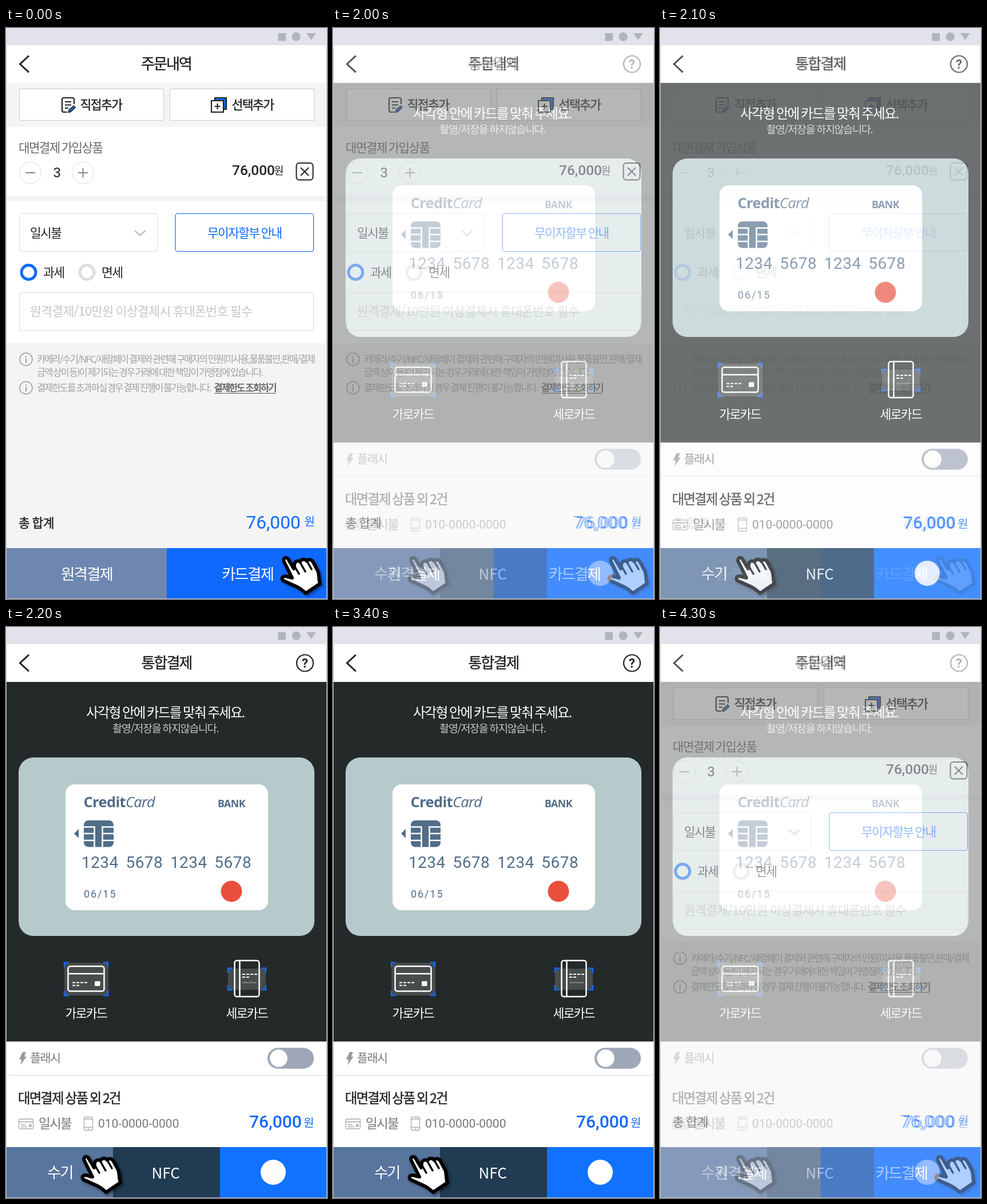
An HTML page for the animation above (4400 ms loop, 561 by 998 pixels).

```html
<!DOCTYPE html>
<html lang="ko">
<meta charset="utf-8">
<title>결제 화면</title>
<style>
html, body { margin: 0; width: 100%; height: 100%; overflow: hidden; background: #fff }
svg { display: block; width: 561px; height: 998px; fill: none }
text { font-family: "Noto Sans CJK KR", "Noto Sans CJK", sans-serif; letter-spacing: -.075em; word-spacing: -.06em; fill: #222; white-space: pre }
.m { font-weight: 500; stroke: #222; stroke-width: .4px }
.r { font-family: Roboto, sans-serif; letter-spacing: 0; stroke: none }
.c { font-family: "Open Sans", sans-serif; letter-spacing: -.025em; fill: #506d89 }
.w text { fill: #fff }
.note text { font-size: 16.5px; letter-spacing: -.115em; fill: #a0a0a0 }
.note .link { fill: #555; stroke: #555; stroke-width: .4px; font-weight: 500 }
.blue, .w .blue { fill: #1168fd }
.gray { fill: #777 }
.hand { filter: drop-shadow(3px 3px 2px rgba(0, 0, 0, .4)) }
</style>
<svg viewBox="0 0 561 998">
  <defs>
    <path id="back" d="M40 48.5L24.5 63L40 77.5" stroke="#222" stroke-width="3"/>
    <g id="info" stroke="#a0a0a0" stroke-width="1.6">
      <circle r="11"/><path d="M0-6v2.4M0-1.5v8" stroke-width="2"/>
    </g>
    <g id="hand" class="hand" stroke="#000" stroke-linejoin="round" stroke-linecap="round">
      <path fill="#fff" stroke-width="6" d="M493 928C489 923 483 927 486 933L500 961L488 958C481 958 481 965 487 967L507 976Q514 979 524 988L549 971C546 964 548 957 545 949L537 934C534 928 528 928 526 932C523 927 516 928 514 933C510 930 504 932 504 938L503 945Z"/>
      <path stroke-width="3.5" d="M504 940l8 14M514 934l9 16M526 932l8 14"/>
    </g>
  </defs>

  <g id="order">
    <path fill="#fff" d="M0 30h561v968H0z"/>
    <path fill="#f4f4f4" d="M0 96h561v76.500H0zM0 293h561v10H0zM0 551h561v358H0z"/>
    <use href="#back"/>
    <text x="236" y="72" font-size="26" class="m">주문내역</text>

    <path fill="#fff" stroke="#ccc" d="M23.500 106.500h252v55h-252zM286.500 106.500h252v55h-252z"/>
    <g stroke="#222" stroke-width="2.200">
      <path d="M119 133v-8q0-3-3-3h-15q-3 0-3 3v19q0 3 3 3h6M103 129h11M103 134.500h11M103 140h6"/>
      <path fill="#1168fd" stroke-width="1.600" d="M118 136l3 3-8 7.500-4 1 1-4z"/>
      <path fill="#1168fd" d="M365 122h20v20h-20z"/>
      <path fill="#fff" d="M359 127h21v20h-21zM369.500 132v10M364.500 137h10"/>
    </g>
    <text x="129.500" y="142" font-size="21.600" class="m">직접추가</text>
    <text x="394.500" y="142" font-size="21.600" class="m">선택추가</text>

    <text x="22" y="217" font-size="21.200" style="fill:#666">대면결제 가입상품</text>
    <g stroke="#ddd"><circle cx="42.500" cy="253" r="19"/><circle cx="134.500" cy="253" r="19"/></g>
    <path stroke="#888" stroke-width="2" d="M34 253h17M126 253h17M134.500 244.500v17"/>
    <text x="82.500" y="261" font-size="24" class="r">3</text>
    <text x="395" y="257" font-size="24.500" class="r m">76,000</text>
    <text x="468.500" y="256" font-size="18.500">원</text>
    <g stroke="#222" stroke-width="2">
      <rect x="507.500" y="236" width="29" height="29.500" rx="5"/>
      <path d="M515 244l14 14M529 244l-14 14"/>
    </g>

    <g stroke="#ddd" stroke-width="1.200">
      <rect x="23.500" y="324.500" width="241" height="66" rx="4"/>
      <rect x="23.500" y="462.500" width="514" height="66" rx="4"/>
      <rect x="296" y="324.500" width="241.500" height="66" rx="4" stroke="#1168fd"/>
    </g>
    <path stroke="#c4c4c4" stroke-width="2.500" d="M225 354l9.500 8.500 9.500-8.500"/>
    <text x="42" y="366" font-size="21.400">일시불</text>
    <text x="352" y="366" font-size="21.400" class="blue">무이자할부 안내</text>
    <g stroke-width="5">
      <circle cx="39.500" cy="427" r="12.500" stroke="#1168fd"/>
      <circle cx="141.500" cy="427" r="12.500" stroke="#ddd"/>
    </g>
    <text x="65" y="435" font-size="21.600">과세</text>
    <text x="167" y="435" font-size="21.600">면세</text>
    <text x="42" y="503" font-size="21.500" style="letter-spacing:-.028em;fill:#c6c6c6">원격결제/10만원 이상결제시 휴대폰번호 필수</text>

    <use href="#info" x="35" y="579"/>
    <use href="#info" x="35" y="629"/>
    <g class="note">
      <text x="54" y="585">카메라/수기/NFC/새람페이 결제와 관련해 구매자의 민원(미사용,물품불만,판매/결제</text>
      <text x="54" y="608">금액 상이 등)이 제기되는 경우 거래에 대한 책임이 가맹점에 있습니다.</text>
      <text x="54" y="635">결제한도를 초과하실 경우 결제 진행이 불가능합니다.</text>
      <text x="363.500" y="635" class="link">결제한도 조회하기</text>
    </g>
    <path stroke="#555" d="M364 638.500h107"/>

    <text x="22" y="873" font-size="21.500" class="m" style="letter-spacing:-.025em">총 합계</text>
    <text x="419.500" y="875" font-size="31.700" class="r blue">76,000</text>
    <text x="521.500" y="870" font-size="20" class="blue">원</text>

    <path fill="#6d87b0" d="M0 909h281v89H0z"/>
    <path fill="#0f69ff" d="M281 909h280v89H281z"/>
    <g class="w" font-size="26.600">
      <text x="96" y="964">원격결제</text>
      <text x="377" y="964">카드결제</text>
    </g>
    <use href="#hand"/>
  </g>

  <g id="pay">
    <path fill="#fff" d="M0 30h561v968H0z"/>
    <use href="#back"/>
    <text x="236.500" y="72" font-size="26" class="m">통합결제</text>
    <circle cx="522.500" cy="63" r="14.500" stroke="#222" stroke-width="2.200"/>
    <text x="522.500" y="71" font-size="22" font-weight="700" text-anchor="middle" class="r">?</text>

    <path fill="#242a2a" d="M0 96h561v628.500H0z"/>
    <g class="w">
      <text x="140" y="158" font-size="23.500">사각형 안에 카드를 맞춰 주세요.</text>
      <text x="186" y="184" font-size="18.600" style="fill:#c4c6c6">촬영/저장을 하지않습니다.</text>
      <text x="103.500" y="683" font-size="21.500">가로카드</text>
      <text x="384.500" y="683" font-size="21.500">세로카드</text>
    </g>

    <rect x="22" y="228" width="517" height="312" rx="26" fill="#b6cacc"/>
    <rect x="104" y="275" width="354" height="220" rx="16" fill="#fff"/>
    <text x="135.500" y="315" font-size="25.500" class="c"><tspan font-weight="700">Credit</tspan><tspan font-style="italic">Card</tspan></text>
    <text x="370" y="315" font-size="17.700" font-weight="700" class="c">BANK</text>
    <path fill="#506d89" d="M127 353l-8 8 8 8z"/>
    <rect x="136" y="338" width="52" height="46.500" rx="8" fill="#506d89"/>
    <path stroke="#fff" stroke-width="2.600" d="M136 349.500h19.800M136 361h18M136 373h18M167.200 349.500h20.800M168 361h20M168 373h20M154.500 349v36M168.500 349v36"/>
    <text x="132" y="421" font-size="28" class="r" style="letter-spacing:.45px;word-spacing:5.300px;fill:#506d89">1234 5678 1234 5678</text>
    <text x="136" y="473" font-size="18" class="r" style="letter-spacing:1.900px;fill:#506d89">06/15</text>
    <circle cx="394" cy="462" r="18.500" fill="#e94f3d"/>

    <path fill="#474c4c" d="M102 587h77v57h-77zM388 597h66v37h-66z"/>
    <path stroke="#1168fd" stroke-width="2.600" d="M110 586.500h-8v8M170 586.500h8v8M110 644h-8v-8M170 644h8v-8M396 596.500h-8v8M446 596.500h8v8M396 634h-8v-8M446 634h8v-8"/>
    <g stroke="#fff" stroke-width="2.500">
      <rect x="108.500" y="593" width="63" height="43.500" rx="4"/>
      <rect x="399.500" y="583" width="43" height="63" rx="4"/>
      <path d="M108 606h64M408.500 583v63"/>
      <path stroke-width="2" stroke-dasharray="5 2" d="M116 621.500h27M116 626.500h12M413 607h26M413 612h12"/>
      <path stroke="#777b7b" d="M413 621.500h25"/>
    </g>
    <rect x="155" y="619" width="9.500" height="8.500" rx="1.500" fill="#fff"/>

    <path fill="#999" d="M29 743h6l-3 8h4L25 766l2.500-10H23z"/>
    <text x="42" y="761" font-size="20.700" class="gray">플래시</text>
    <rect x="457" y="735.500" width="81" height="36.500" rx="18.250" fill="#9fa8b8"/>
    <circle cx="476.500" cy="753.800" r="15.300" fill="#fff"/>
    <path stroke="#ddd" d="M0 783.500h561"/>

    <text x="21" y="832" font-size="23.300" class="m">대면결제 상품 외 2건</text>
    <g stroke="#aaa" stroke-width="1.300">
      <rect x="22.500" y="860" width="25" height="17" rx="1.500"/>
      <path d="M22 865h26M26 870h8M26 873.500h11"/>
      <path fill="#aaa" d="M41 870h3v3h-3z"/>
      <rect x="136.500" y="856.500" width="15" height="23" rx="2"/>
      <path d="M136 860h16M136 874.500h16M143 877h2"/>
    </g>
    <text x="57" y="875.500" font-size="22.500" class="gray">일시불</text>
    <text x="161" y="875" font-size="21" class="r gray">010-0000-0000</text>
    <text x="425" y="875" font-size="30" class="r m blue">76,000</text>
    <text x="520" y="873.500" font-size="20" class="blue">원</text>

    <path fill="#57759d" d="M0 909h187v89H0z"/>
    <path fill="#213b52" d="M187 909h187v89H187z"/>
    <path fill="#1072ff" d="M374 909h187v89H374z"/>
    <g class="w">
      <text x="72" y="963" font-size="26.300">수기</text>
      <text x="254.500" y="964" font-size="26" style="letter-spacing:0">NFC</text>
    </g>
    <circle cx="467" cy="953" r="22" fill="#fff"/>
    <use href="#hand" x="-349"/>
  </g>

  <path fill="#e1e2ea" d="M0 0h561v30H0z"/>
  <path fill="#b1b3bd" d="M475.500 9h13.500v13.500h-13.500zM525 9h16.500l-8.250 12z"/>
  <circle cx="507.200" cy="15.200" r="7.600" fill="#b1b3bd"/>
  <path stroke="#c3c5d0" d="M.5 30v967.500h560V30"/>
</svg>
<script>
const order = document.getElementById("order");
const pay = document.getElementById("pay");
const LOOP = 4400, HOLD = 2000, STEP = 100;

// Hold, two blend steps in, hold, two blend steps out.
function payOpacity(t) {
  const half = LOOP / 2;
  const blend = Math.max(0, Math.floor((t % half - HOLD) / STEP) + 1) / 3;
  return t < half ? blend : 1 - blend;
}

// Both screens fade, so the white page shows through between them.
function draw() {
  const shown = payOpacity(performance.now() % LOOP);
  pay.setAttribute("opacity", shown);
  order.setAttribute("opacity", 1 - shown);
  requestAnimationFrame(draw);
}
draw();
</script>
</html>
```
